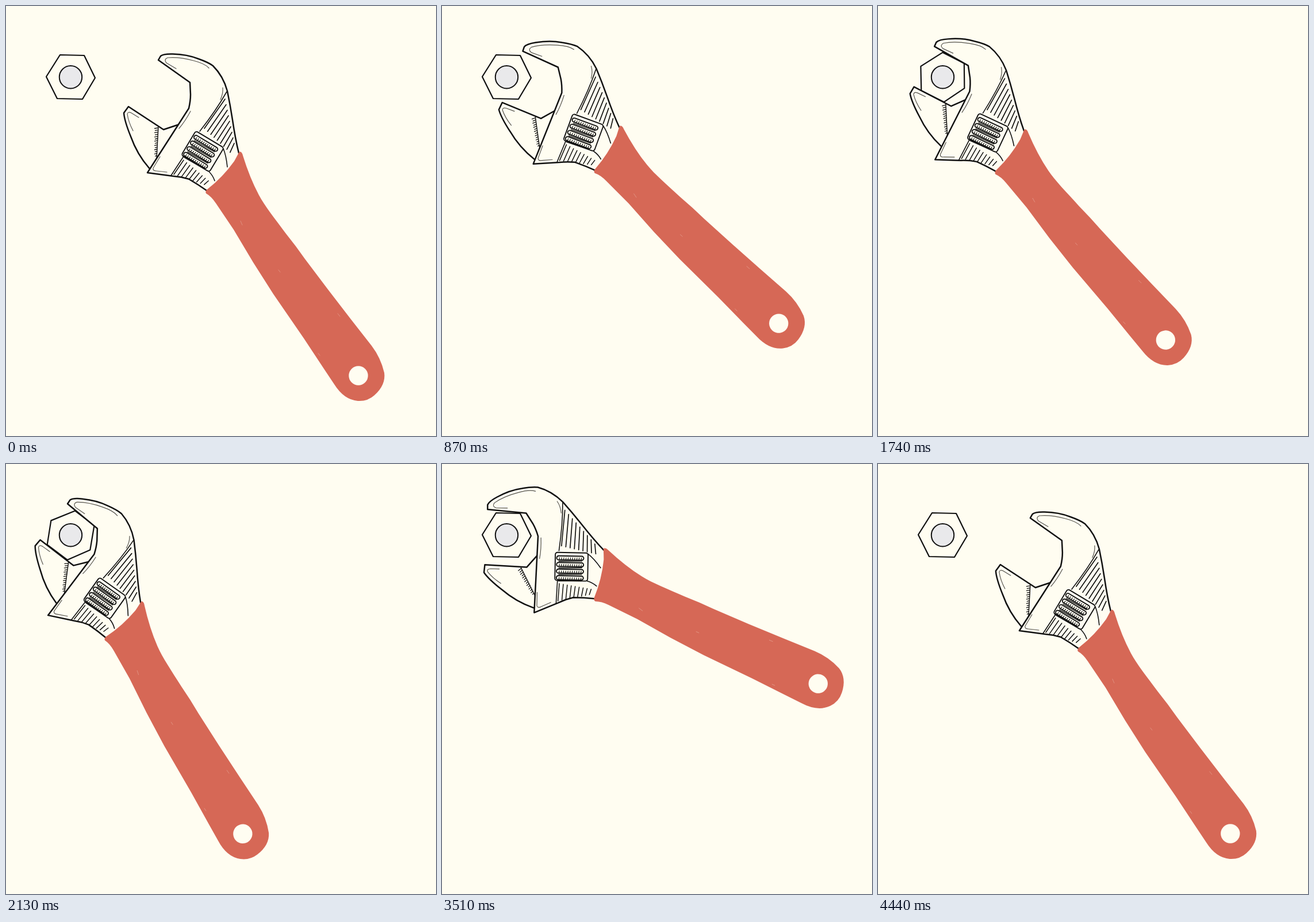
Recreate the animation shown at these times as an HTML page with a canvas. Size 748 px wide and 748 px high, loop 4500 ms.

```html
<!DOCTYPE html>
<html lang="en">
<head>
<meta charset="utf-8">
<title>Wrench and nut</title>
<style>
html, body { margin: 0; width: 100%; height: 100%; overflow: hidden; background: #fffdf1; }
canvas { display: block; width: 748px; height: 748px; }
</style>
</head>
<body>
<canvas id="stage" width="748" height="748"></canvas>
<script>
const ctx = document.getElementById('stage').getContext('2d');
const LOOP = 4500, STEP = 30;
const PAPER = '#fffdf1', INK = '#111', RED = '#d66856', SOFT = '#55534e';
const NUT = { x: 112.5, y: 123.7 };
const GRIP = { x: 109.2, y: 119.1 };    // turning point while the jaws hold the nut
const PIVOT = { x: 271, y: 143.6 };     // the same point in the wrench drawing
const TURN_START = -31.2;

const sine = x => (1 - Math.cos(Math.PI * x)) / 2;
const cubic = x => x < .5 ? 4 * x ** 3 : 1 - 4 * (1 - x) ** 3;
const outQuad = x => 1 - (1 - x) ** 2;

// Each key: start, end, value reached, easing; values hold between keys.
function track(t, first, keys) {
  let value = first;
  for (const [start, end, to, ease] of keys) {
    if (t <= start) break;
    value += (to - value) * ease(Math.min(1, (t - start) / (end - start)));
  }
  return value;
}

const ANGLE = [
  [487, 1440, TURN_START, sine],
  [1650, 1862, 6.7, outQuad],
  [1862, 2220, 4, sine],
  [2220, 2520, 5.3, sine],
  [2760, 2850, 6.6, outQuad],
  [2850, 3270, TURN_START, sine],
  [3392, 4272, 0, sine]
];
const APPROACH = [[280, 1290, 1, cubic], [3500, 4500, 0, cubic]];
const JAW = [[1450, 1620, 17.5, sine], [3300, 3480, 0, sine]];

const shape = {
  body: new Path2D('M349 321Q335 311 318 301Q305 297 291 296L246 290L300 206L318 178Q321 165 321 154L320 133L265 94L269 87Q274 83 290 83.5Q315 84 335 92Q352 98 360 104Q378 122 385 148Q390 172 394 198Q399 232 405 256'),
  bodyDetail: new Path2D('M384 149Q366 181 337 218M310 260L287 295M378 248Q383 260 385 280M353 288Q360 295 363 304'),
  bodyShine: new Path2D('M296 109L279 99Q274 93 281 90Q300 88 326 95Q346 100 353 108M377 142Q378 152 373 163M321 183Q312 200 301 213M268 262L256 282Q255 287 262 287L280 289'),
  jaw: new Path2D('M256 288L249 282Q228 258 217 227Q206 200 205 186L213 175L274 215L301 206'),
  jawShine: new Path2D('M221 217Q213 202 211 188Q212 183 218 186L231 194'),
  handle: new Path2D('M408 253.5Q411 255 412 260Q424 299 440 329C450 348 468 370 487 396Q504 417 520 440L560 493L600 545L636 591Q652 612 658 638Q661 659 641 677Q629 688 612 687Q588 685 571 658L553 631L518 578L465 501L430 446L396 389L365 343Q357 331 348 326Q346 322 350 319Q377 298 397 270Q402 261 405 255Q406 253 408 253.5Z'),
  scratches: new Path2D('M408 374L411 381M474 459L477 463M577 535L581 540M543 604L546 608'),
  nut: new Path2D('M94 85L136 86L155 125L133 162L89 161L70 123Z')
};

function stroke(path, width, color = INK) {
  ctx.lineWidth = width;
  ctx.strokeStyle = color;
  path ? ctx.stroke(path) : ctx.stroke();
}

function fill(path, color) {
  ctx.fillStyle = color;
  ctx.fill(path);
}

function hatch(count, width, line) {
  ctx.beginPath();
  for (let i = 0; i < count; i++) {
    const [x1, y1, x2, y2] = line(i);
    ctx.moveTo(x1, y1);
    ctx.lineTo(x2, y2);
  }
  stroke(null, width);
}

function drawNut(angle) {
  ctx.save();
  ctx.translate(NUT.x, NUT.y);
  ctx.rotate(angle);
  ctx.translate(-NUT.x, -NUT.y);
  stroke(shape.nut, 2.2);
  ctx.restore();
  ctx.beginPath();
  ctx.arc(NUT.x, NUT.y, 19.7, 0, 7);
  ctx.fillStyle = '#e9e9eb';
  ctx.fill();
  stroke(null, 2);
}

function drawJaw(slide) {
  ctx.save();
  ctx.translate(.54 * slide, -.84 * slide);
  fill(shape.jaw, PAPER);
  stroke(shape.jaw, 2.5);
  stroke(shape.jawShine, 1.2, SOFT);
  hatch(1, 1.4, () => [265, 210, 262, 264]);
  hatch(14, 1.3, i => [258.5 + i % 2, 213 + i * 3.7, 264.5 - i * .15, 212 + i * 3.7]);
  ctx.restore();
}

function drawWorm() {
  ctx.save();
  ctx.translate(342, 253);
  ctx.rotate(31 * Math.PI / 180);
  ctx.beginPath();
  ctx.roundRect(-28.5, -24.5, 57, 49, 4);
  ctx.fillStyle = PAPER;
  ctx.fill();
  stroke(null, 1.9);
  for (let row = 0; row < 4; row++) {
    const y = -15 + row * 11.5;
    ctx.beginPath();
    ctx.roundRect(-26, y - 3.5, 47, 7, 3.5);
    stroke(null, 1.9);
    hatch(11, 1.2, i => [-21 + i * 3.8, y - .5, -21.5 + i * 3.8, y + 3.5]);
    hatch(1, 1.3, () => [-22, y + 6, 18, y + 5]);
  }
  ctx.restore();
}

function drawBody() {
  fill(shape.body, PAPER);
  stroke(shape.body, 2.5);
  stroke(shape.bodyDetail, 1.6);
  stroke(shape.bodyShine, 1.2, SOFT);
  hatch(9, 1.7, i => [345 + 5.6 * i, 213 + 5.2 * i, 381 + 2 * i, 162 + 9.6 * i]);
  hatch(9, 1.5, i => [309 + 5.4 * i, 268 + 4.5 * i, 292 + 6.6 * i, 293 + 2.2 * i]);
  drawWorm();
}

function drawHandle() {
  fill(shape.handle, RED);
  stroke(shape.scratches, .8, '#e39a8a');
  ctx.beginPath();
  ctx.arc(613, 643, 16.7, 0, 7);
  ctx.fillStyle = PAPER;
  ctx.fill();
}

function draw(t) {
  const degrees = track(t, 0, ANGLE);
  const near = track(t, 0, APPROACH);
  const gripped = t >= 1650 && t <= 3300;
  const rad = Math.PI / 180;

  ctx.fillStyle = PAPER;
  ctx.fillRect(0, 0, 748, 748);
  drawNut(gripped ? (degrees - TURN_START) * rad : 0);

  ctx.save();
  ctx.translate(PIVOT.x + (GRIP.x - PIVOT.x) * near, PIVOT.y + (GRIP.y - PIVOT.y) * near);
  ctx.rotate(degrees * rad);
  ctx.translate(-PIVOT.x, -PIVOT.y);
  drawJaw(track(t, 0, JAW));
  drawBody();
  drawHandle();
  ctx.restore();
}

ctx.lineCap = ctx.lineJoin = 'round';
const began = performance.now();
function tick() {
  const t = (performance.now() - began) % LOOP;
  draw(Math.floor(t / STEP) * STEP);
  requestAnimationFrame(tick);
}
tick();
</script>
</body>
</html>
```
